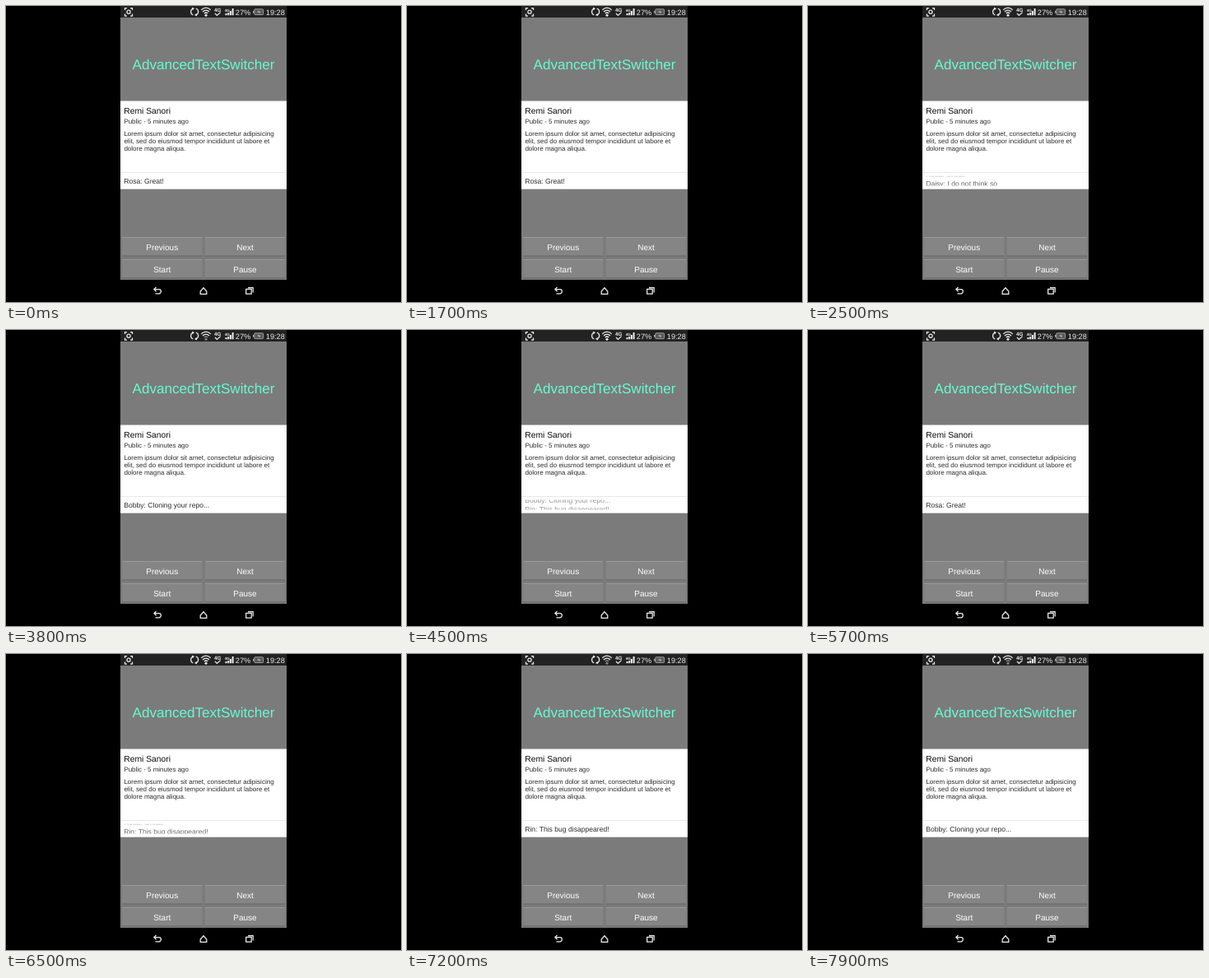
Write an HTML page that moves like this. It is 480x360 px and loops after 8000 ms.

```html
<!DOCTYPE html>
<html lang="en">
<head>
<meta charset="utf-8">
<title>Text switcher</title>
<style>
html, body { margin: 0; width: 100%; height: 100%; overflow: hidden; background: #000; }
svg { display: block; width: 100vw; height: 100vh; }
text { font-family: "Liberation Sans", Arial, sans-serif; text-rendering: geometricPrecision; }
.bar text { font-size: 9.2px; fill: #eee; }
.line { fill: none; stroke: #eee; stroke-width: 1.25; }
.small { font-size: 8.03px; fill: #2c2c2c; }
.comment { font-size: 8.58px; fill: #2c2c2c; }
.label { font-size: 10px; fill: #fff; text-anchor: middle; }
</style>
</head>
<body>
<svg viewBox="0 0 480 360">
  <defs>
    <clipPath id="slot"><rect x="139" y="206.4" width="202" height="12.2"/></clipPath>
    <clipPath id="rest"><rect x="139" y="205" width="202" height="16"/></clipPath>
  </defs>
  <rect width="480" height="360"/>
  <rect x="139" width="202" height="14" fill="#222"/>
  <rect x="139" y="14" width="202" height="319" fill="#7b7b7b"/>

  <g class="bar">
    <path class="line" d="M144.5 5V2.5H147M151 2.5H153.5V5M153.5 9.5V12H151M147 12H144.5V9.5"/>
    <circle class="line" cx="149" cy="7.2" r="2.1"/>
    <path class="line" d="M227.3 11A4.2 4.2 0 0 1 227 3.3M230.8 3A4.2 4.2 0 0 1 231.2 10.8"/>
    <path fill="#eee" d="M226 1.5l3 1.6-2.4 2.2zM232.2 12.6l-3.2-1.5 2.5-2.2z"/>
    <path class="line" d="M237.3 4.8Q243 -0.6 248.7 4.8M239 7Q243 3.2 247 7"/>
    <g id="wifi">
      <path class="line" d="M240.8 9Q243 7 245.2 9"/>
      <circle cx="243" cy="11.3" r="1.5" fill="#eee"/>
    </g>
    <text x="253" y="6.8" style="font-size:6.3px;font-weight:700">4G</text>
    <path class="line" d="M254 9l2.4 2.4 4.2-3.8"/>
    <text x="265.8" y="7" style="font-size:4.6px;font-weight:700">4G</text>
    <path fill="#eee" d="M266.5 9h2v2.3h-2zM269.2 8h2v3.3h-2zM271.9 6h2v5.3h-2zM274.6 3h2v8.3h-2z"/>
    <text x="278.8" y="10.5">27%</text>
    <rect x="301.8" y="3.8" width="10.8" height="6.8" rx="1" fill="#555" stroke="#aaa" stroke-width="0.9"/>
    <path fill="#aaa" d="M300 6h1.6v2.5H300zM304.5 7.2l3.2-1.9v1.5h2.6l-3.2 2.4V7.7z"/>
    <text x="315.8" y="10.5">19:28</text>
  </g>

  <text x="240" y="77.1" font-size="17.1" fill="#66fbd0" text-anchor="middle">AdvancedTextSwitcher</text>

  <rect x="139" y="115.5" width="202" height="107.2" fill="#fff"/>
  <rect x="139" y="202" width="202" height="1" fill="#e8e8e8"/>
  <text x="143.3" y="131.2" font-size="10.3" fill="#0c0c0c">Remi Sanori</text>
  <text class="small" x="143.4" y="142.5" style="font-size:7.95px">Public - 5 minutes ago</text>
  <text class="small" x="143.4" y="157.8">Lorem ipsum dolor sit amet, consectetur adipisicing</text>
  <text class="small" x="143.4" y="166.9">elit, sed do eiusmod tempor incididunt ut labore et</text>
  <text class="small" x="143.4" y="176">dolore magna aliqua.</text>
  <g id="window">
    <text class="comment" id="leaving" x="143.2"></text>
    <text class="comment" id="current" x="143.2"></text>
  </g>

  <g id="buttons"></g>

  <g class="line">
    <path d="M180 344.6H186.2Q188.3 344.6 188.3 347T186.2 349.8H181.5M182.6 342L179.9 344.6 182.6 347.2"/>
    <path d="M236.2 347L240 342.8 243.8 347V350.3H236.2Z"/>
    <path d="M291.7 344.4H298.2V350.2H291.7ZM294 342.6H300.2V348.4"/>
  </g>
</svg>
<script>
const LOOP = 8000, SLIDE = 400, STEP = 11, BASE = 215.9;
const comments = [
  "Rosa: Great!",
  "Daisy: I do not think so",
  "Bobby: Cloning your repo...",
  "Rin: This bug disappeared!"
];
// [start time, comment shown next]
const switches = [[2240, 1], [3180, 2], [4300, 3], [5290, 0], [6250, 3], [7250, 2]];
const weakWifi = [[3800, 4200], [6900, 8000]];

const $ = id => document.getElementById(id);
const ease = x => 0.5 - Math.cos(Math.PI * x) / 2;

function button(x, y, label) {
  return `<rect x="${x}" y="${y}" width="97" height="23" rx="1" fill="#858585"/>
    <rect x="${x}" y="${y}" width="97" height="0.8" fill="#a0a0a0"/>
    <rect x="${x}" y="${y + 22.5}" width="97" height="1" fill="#666"/>
    <text class="label" x="${x + 48.5}" y="${y + 15.6}">${label}</text>`;
}
$("buttons").innerHTML = button(141.2, 281, "Previous") + button(242, 281, "Next") +
  button(141.2, 308, "Start") + button(242, 308, "Pause");

function place(el, text, shift, alpha) {
  if (el.textContent !== text) el.textContent = text;
  el.setAttribute("y", BASE + shift);
  el.setAttribute("opacity", alpha);
}

function draw(t) {
  let before = 0, now = 0, start = -SLIDE;
  for (const [time, next] of switches) {
    if (t < time) break;
    before = now;
    now = next;
    start = time;
  }
  const p = ease(Math.min(1, (t - start) / SLIDE));
  place($("leaving"), comments[before], -STEP * p, 1 - p);
  place($("current"), comments[now], STEP * (1 - p), p);
  $("window").setAttribute("clip-path", p < 1 ? "url(#slot)" : "url(#rest)");
  const weak = weakWifi.some(([a, b]) => t >= a && t < b);
  $("wifi").setAttribute("opacity", weak ? 0.5 : 1);
}

const origin = performance.now();
function tick() {
  draw((performance.now() - origin) % LOOP);
  requestAnimationFrame(tick);
}
draw(0);
requestAnimationFrame(tick);
</script>
</body>
</html>
```
